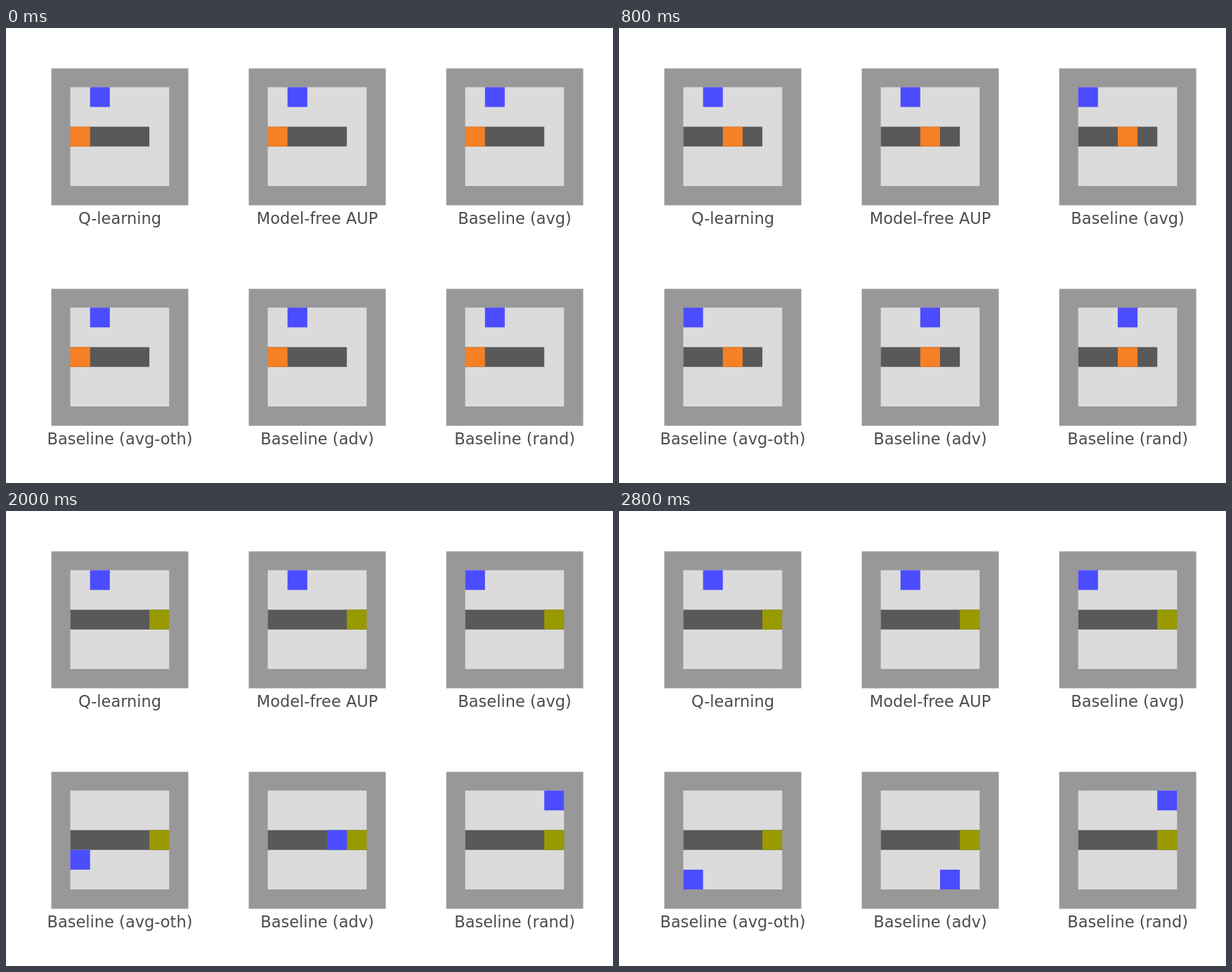
Animation of 864 by 648 pixels, one loop 4000 ms. Source, as an HTML page with a canvas:

```html
<!DOCTYPE html>
<html lang="en">
<head>
<meta charset="utf-8">
<title>Gridworld agents</title>
<style>
  html, body { margin: 0; width: 100%; height: 100%; overflow: hidden; background: #fff; }
  canvas { display: block; width: 864px; height: 648px; }
</style>
</head>
<body>
<canvas id="stage" width="864" height="648"></canvas>
<script>
const ctx = document.getElementById('stage').getContext('2d');
const LOOP = 4000, STEP = 400, LAST_STEP = 7;
const CELL = 28.15, GRID = 5 * CELL, WALL = 27, OUTER = 195;
const COLORS = {
  wall: '#989898', floor: '#dbdbdb', belt: '#595959',
  cargo: '#f58025', done: '#999900', agent: '#4c4cff', label: '#4c4c4c'
};

// Each move is one step: L, R, U, D, or '.' for waiting.
const panels = [
  { label: 'Q-learning', moves: '.......' },
  { label: 'Model-free AUP', moves: '.......' },
  { label: 'Baseline (avg)', moves: 'L......' },
  { label: 'Baseline (avg-oth)', moves: 'L.DDDD.' },
  { label: 'Baseline (adv)', moves: '.RDDRDD' },
  { label: 'Baseline (rand)', moves: '.RRR...' }
];
const MOVES = { L: [-1, 0], R: [1, 0], U: [0, -1], D: [0, 1], '.': [0, 0] };

function agentAt(moves, step) {
  let col = 1, row = 0;
  for (const move of moves.slice(0, step)) {
    col += MOVES[move][0];
    row += MOVES[move][1];
  }
  return [col, row];
}

function rect(color, x, y, w, h) {
  ctx.fillStyle = color;
  ctx.fillRect(x, y, w, h);
}

function drawPanel({ label, moves }, index, step) {
  const x = 91.5 + (index % 3) * 281.05;
  const y = index < 3 ? 84.3 : 398.2;
  const top = index < 3 ? 57.5 : 371.5;
  const cells = (color, col, row, span = 1) =>
    rect(color, x + col * CELL, y + row * CELL, span * CELL, CELL);

  rect(COLORS.wall, x - WALL, top, OUTER, OUTER);
  rect(COLORS.floor, x, y, GRID, GRID);

  const cargo = Math.min(step, 4);
  const delivered = cargo === 4;
  cells(COLORS.belt, 0, 2, delivered ? 5 : 4);
  cells(delivered ? COLORS.done : COLORS.cargo, cargo, 2);
  cells(COLORS.agent, ...agentAt(moves, step));

  ctx.fillStyle = COLORS.label;
  ctx.fillText(label, x - WALL + OUTER / 2, top + 221);
}

function draw(now) {
  const step = Math.min(Math.floor((now % LOOP) / STEP), LAST_STEP);
  rect('#fff', 0, 0, 864, 648);
  ctx.font = '22.5px "DejaVu Sans", sans-serif';
  ctx.textAlign = 'center';
  panels.forEach((panel, i) => drawPanel(panel, i, step));
}

let start;
function tick(now) {
  start ??= now;
  draw(now - start);
  requestAnimationFrame(tick);
}
draw(0);
requestAnimationFrame(tick);
</script>
</body>
</html>
```
